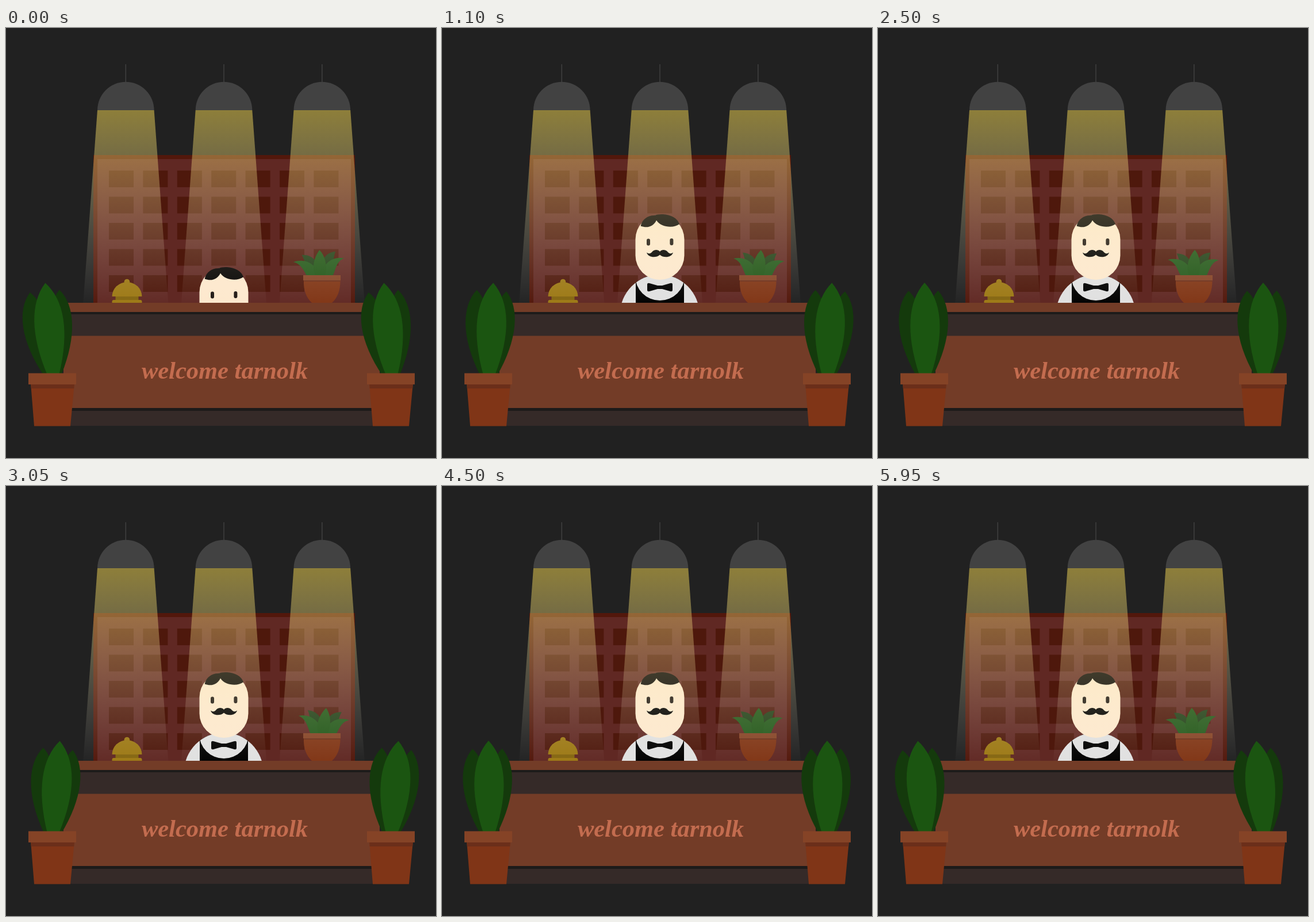
An HTML page with a canvas for the animation above (6000 ms loop, 748 px wide and 748 px high).

```html
<!DOCTYPE html>
<html lang="en">
<head>
<meta charset="utf-8">
<title>Reception desk</title>
<style>
  html, body { margin: 0; width: 100%; height: 100%; overflow: hidden; background: #212121; }
  canvas { display: block; width: 748px; height: 748px; }
</style>
</head>
<body>
<canvas id="stage" width="748" height="748"></canvas>
<script>
const ctx = document.getElementById('stage').getContext('2d');
const LOOP = 6000;
const BEAT = 2000 / 3;
const DESK_Y = 478;
const LAMPS = [208.3, 379, 549.8];

function rect(color, x1, y1, x2, y2) {
  ctx.fillStyle = color;
  ctx.fillRect(x1, y1, x2 - x1, y2 - y1);
}

function pill(color, x1, y1, x2, y2, r) {
  ctx.fillStyle = color;
  ctx.beginPath();
  ctx.roundRect(x1, y1, x2 - x1, y2 - y1, r);
  ctx.fill();
}

function shape(color, d) {
  ctx.fillStyle = color;
  ctx.fill(new Path2D(d));
}

function disc(color, x, y, r) {
  ctx.fillStyle = color;
  ctx.beginPath();
  ctx.arc(x, y, r, 0, Math.PI * 2);
  ctx.fill();
}

function group(draw, x = 0, y = 0) {
  ctx.save();
  ctx.translate(x, y);
  draw();
  ctx.restore();
}

function rotated(angle, px, py, draw) {
  group(() => {
    ctx.rotate(angle);
    ctx.translate(-px, -py);
    draw();
  }, px, py);
}

// y of a cubic bezier timing curve at progress p
function bezier(x1, y1, x2, y2, p) {
  const at = (a, b, s) => 3 * (1 - s) * (1 - s) * s * a + 3 * (1 - s) * s * s * b + s * s * s;
  let lo = 0, hi = 1;
  for (let i = 0; i < 30; i++) {
    const mid = (lo + hi) / 2;
    if (at(x1, x2, mid) < p) lo = mid; else hi = mid;
  }
  return at(y1, y2, (lo + hi) / 2);
}

function sway(t) {
  return -5 * Math.PI / 180 * Math.cos(2 * Math.PI * (t + 8) / BEAT);
}

function rise(t) {
  if (t >= BEAT) return 0;
  return 92 * (1 - bezier(0.68, -0.55, 0.265, 1.55, t / BEAT));
}

function flicker(t) {
  const p = (t / BEAT) % 1;
  const dip = c => Math.max(0, 1 - Math.abs(p - c) / 0.03);
  return 1 - 0.75 * Math.max(dip(0.15), dip(0.895));
}

function cabinet() {
  rect('#52170b', 152, 221, 607, DESK_Y);
  rect('#602823', 159, 228, 600, DESK_Y);
  for (let row = 0; row < 5; row++) {
    for (let col = 0; col < 7; col++) {
      const x = 179 + col * 59.4, y = 248 + row * 45.5;
      rect('#4e180c', x, y, x + 43, y + 29);
    }
  }
}

function bell() {
  disc('#9c7814', 210.4, 441.5, 4.8);
  ctx.beginPath();
  ctx.ellipse(210.5, 467, 26, 25, 0, Math.PI, 0);
  ctx.fill();
  rect('#84650f', 190.5, 467, 230.5, 473);
  pill('#9c7814', 184.5, 473, 236.5, 478, [3, 3, 0, 0]);
}

function man() {
  ctx.save();
  ctx.beginPath();
  ctx.arc(378.7, 498, 69, 0, Math.PI * 2);
  ctx.clip();
  rect('#e0e0e0', 300, 420, 460, 580);
  rect('#000', 337, 420, 421, 580);
  disc('#e0e0e0', 379, 431, 43);
  ctx.restore();

  shape('#000', 'M357 446 Q357 443 361 444 L375 448 H383 L397 444 Q401 443 401 446 V456 Q401 459 397 458 L383 454 H375 L361 458 Q357 459 357 456 Z');

  pill('#fde8cd', 336.5, 325, 421.5, 438, 42.4);
  shape('#060403', 'M345.5 344.5 C348 333 358 326 369 326 C382 321.5 407 324 413 341 C403 349 381 347 373 334.5 C368 345 358 349 345.5 344.5 Z');
  pill('#1e1713', 356, 366.5, 362, 378.5, 3);
  pill('#1e1713', 396.4, 366, 402.4, 378, 3);
  shape('#000', 'M379 389 C383 384 390 386 393 390 C396 393 399 393 402 390.5 C400 399 386 401 379 394.5 C372 401 358 399 356 390.5 C359 393 362 393 365 390 C368 386 375 384 379 389 Z');
}

function deskPlant(angle) {
  rotated(angle, 550, 458, () => {
    shape('#203f18', 'M520 392 C538 392 550 406 551 434 H538 C526 420 526 404 520 392 Z');
    shape('#203f18', 'M579 391 C561 391 549 406 548 434 H561 C574 420 573 404 579 391 Z');
    shape('#23581b', 'M504.5 403 C527 397 545 411 549 434 H530 C523 430 522 408 504.5 403 Z');
    shape('#23581b', 'M593 404 C572 398 554 411 550 434 H569 C576 429 576 409 593 404 Z');
    shape('#215618', 'M551.5 386 C562 398 563 419 556 434 H543 C534 418 540 399 551.5 386 Z');
  });
  shape('#803515', 'M518 438 H581.5 C582 457 576 470 567 478 H532 C523 470 517 457 518 438 Z');
  rect('#6b2e19', 518.5, 438, 581, 441);
  rect('#854326', 517, 430, 582, 439);
}

function lamp(x) {
  rect('#424242', x - 0.7, 63, x + 0.7, 95);
  ctx.fillStyle = '#424242';
  ctx.beginPath();
  ctx.arc(x, 143, 49.3, Math.PI, 0);
  ctx.fill();
}

function beam(x, level) {
  const glow = ctx.createLinearGradient(0, 143, 0, DESK_Y);
  glow.addColorStop(0, 'rgba(255,224,84,0.49)');
  glow.addColorStop(1, 'rgba(255,255,255,0.015)');
  ctx.globalAlpha = level;
  ctx.fillStyle = glow;
  ctx.beginPath();
  ctx.moveTo(x - 49.3, 143);
  ctx.lineTo(x + 49.3, 143);
  ctx.lineTo(x + 74, DESK_Y);
  ctx.lineTo(x - 74, DESK_Y);
  ctx.fill();
  ctx.globalAlpha = 1;
}

function desk() {
  rect('#352a28', 100, DESK_Y, 650, 692);
  rect('#733c27', 100, 478, 650, 494);
  rect('#1d1b1a', 100, 494, 650, 498);
  rect('#733c27', 100, 535.5, 650, 661);
  rect('#1d1b1a', 100, 661, 650, 666);
  ctx.font = 'italic bold 42.5px "Liberation Serif", "Times New Roman", serif';
  ctx.textAlign = 'center';
  ctx.fillStyle = '#c36c4f';
  ctx.fillText('welcome tarnolk', 380.5, 610);
}

function floorPlant(angle) {
  rotated(angle, 82, 600, () => {
    shape('#143a0c', 'M54 457 C29 485 30 540 66 604 H85 C86 540 80 480 54 457 Z');
    shape('#143a0c', 'M105.5 457 C130 485 129 540 96 604 H77 C76 540 81 480 105.5 457 Z');
    shape('#1b5511', 'M82 443 C112 475 117 530 92 604 H72 C48 530 53 475 82 443 Z');
  });
  shape('#803517', 'M43 618 H119 L112 692.5 H49 Z');
  shape('#6b2f1a', 'M43 618 H119 L118.2 627 H43.8 Z');
  rect('#854326', 39, 600.5, 122, 620);
}

function draw(t) {
  const angle = sway(t);
  rect('#212121', 0, 0, 748, 748);
  cabinet();
  bell();
  group(man, 0, rise(t));
  deskPlant(angle);
  LAMPS.forEach((x, i) => {
    beam(x, i === 2 ? flicker(t) : 1);
    lamp(x);
  });
  desk();
  floorPlant(angle);
  group(() => floorPlant(angle), 589, 0);
}

let start = null;
function tick(now) {
  if (start === null) start = now;
  draw((now - start) % LOOP);
  requestAnimationFrame(tick);
}
draw(0);
requestAnimationFrame(tick);
</script>
</body>
</html>
```
